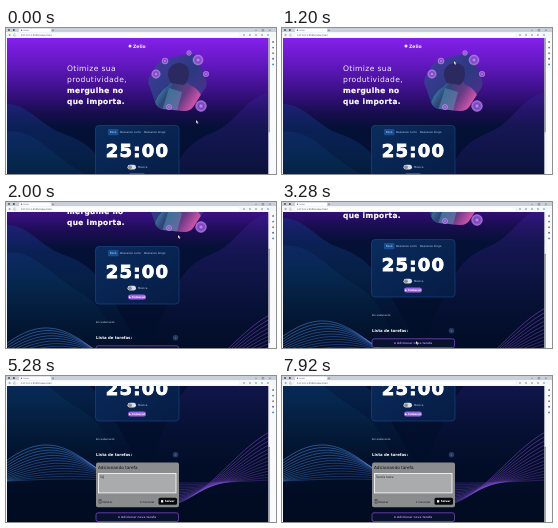
These frames come from a looping animation (270 px wide and 146 px high, 8 s). An HTML page:

```html
<!DOCTYPE html>
<html lang="pt-BR">
<head>
<meta charset="utf-8">
<title>Temporizador</title>
<style>
html, body { margin: 0; width: 100%; height: 100%; overflow: hidden; background: #020d28; }
svg { display: block; width: 100vw; height: 100vh; font-family: "DejaVu Sans", sans-serif; }
.b { font-weight: 700; }
.mid { text-anchor: middle; }
</style>
</head>
<body>
<svg viewBox="0 0 270 146" preserveAspectRatio="none">
  <defs>
    <linearGradient id="sky" x1="0" y1="0" x2="0" y2="1">
      <stop offset="0" stop-color="#8420ea"/>
      <stop offset=".3" stop-color="#6118be"/>
      <stop offset=".6" stop-color="#3a1084"/>
      <stop offset=".82" stop-color="#190d50"/>
      <stop offset="1" stop-color="#041036"/>
    </linearGradient>
    <linearGradient id="deep" x1="0" y1="0" x2="0" y2="1">
      <stop offset="0" stop-color="#041036"/>
      <stop offset=".4" stop-color="#020f2d"/>
      <stop offset="1" stop-color="#010b20"/>
    </linearGradient>
    <linearGradient id="hillLeft" gradientUnits="userSpaceOnUse" x1="0" y1="70" x2="0" y2="205">
      <stop offset="0" stop-color="#1c2f8c" stop-opacity=".55"/>
      <stop offset=".45" stop-color="#07305a" stop-opacity=".5"/>
      <stop offset="1" stop-color="#042238" stop-opacity="0"/>
    </linearGradient>
    <linearGradient id="hillRight" gradientUnits="userSpaceOnUse" x1="0" y1="60" x2="0" y2="200">
      <stop offset="0" stop-color="#3a1f94" stop-opacity=".5"/>
      <stop offset=".5" stop-color="#1c1a5c" stop-opacity=".45"/>
      <stop offset="1" stop-color="#0c1238" stop-opacity="0"/>
    </linearGradient>
    <linearGradient id="line" gradientUnits="userSpaceOnUse" x1="0" y1="0" x2="264" y2="0">
      <stop offset="0" stop-color="#4aa0ee"/>
      <stop offset=".4" stop-color="#4a78dc"/>
      <stop offset=".7" stop-color="#7a4ad0"/>
      <stop offset="1" stop-color="#9c4ee0"/>
    </linearGradient>
    <linearGradient id="card" x1="0" y1="0" x2="1" y2="1">
      <stop offset="0" stop-color="#0a2c5e"/>
      <stop offset="1" stop-color="#061c44"/>
    </linearGradient>
    <linearGradient id="frame" x1="0" y1="0" x2="1" y2="1">
      <stop offset="0" stop-color="#4a3aa4"/>
      <stop offset=".5" stop-color="#2a3a80"/>
      <stop offset="1" stop-color="#5c2a94"/>
    </linearGradient>
    <linearGradient id="coat" x1="0" y1="0" x2="1" y2=".4">
      <stop offset="0" stop-color="#4ac4d4"/>
      <stop offset=".4" stop-color="#2f4478"/>
      <stop offset=".7" stop-color="#6a3a86"/>
      <stop offset="1" stop-color="#dc58ac"/>
    </linearGradient>
    <radialGradient id="ball">
      <stop offset="0" stop-color="#d9b8f4"/>
      <stop offset=".45" stop-color="#8644cc"/>
      <stop offset="1" stop-color="#b27be6"/>
    </radialGradient>
    <clipPath id="view"><rect x="1" y="10" width="261.5" height="136"/></clipPath>
    <clipPath id="blob"><path id="blobShape" d="M149 39 Q152 34 158 32 L182 26 Q189 25 192 31 L200 52 Q202 57 198 62 L187 79 Q184 83 178 83 L157 81 Q151 80 149 74 L143 57 Q141 52 144 48Z"/></clipPath>
  </defs>

  <rect width="270" height="146" fill="#f6f7f9"/>
  <g clip-path="url(#view)">
    <g id="page">
      <rect y="10" width="264" height="90" fill="url(#sky)"/>
      <rect y="99.5" width="264" height="160" fill="url(#deep)"/>
      <path d="M0 76 C24 76 34 98 58 106 S92 126 106 150 S128 190 140 205 H0Z" fill="url(#hillLeft)"/>
      <path d="M0 104 C28 100 44 126 72 142 S104 180 116 205 H0Z" fill="url(#hillLeft)"/>
      <path d="M264 64 C238 70 232 94 208 104 S176 124 164 150 S146 188 140 205 H264Z" fill="url(#hillRight)"/>
      <g id="waves" fill="none" stroke="url(#line)" stroke-width=".55"></g>

      <circle cx="124" cy="18" r="1.5" fill="#f3eaff"/>
      <text class="b" x="127" y="19.8" font-size="4.6" fill="#f3eaff">Zelio</text>

      <g fill="#f1eafc" font-size="7.6" letter-spacing=".35">
        <text x="61" y="42.5">Otimize sua</text>
        <text x="61" y="53.5">produtividade,</text>
        <g class="b" font-size="7.4" fill="#fff" stroke="#fff" stroke-width=".2">
          <text x="61" y="64.5">mergulhe no</text>
          <text x="61" y="75.5">que importa.</text>
        </g>
      </g>

      <use href="#blobShape" fill="url(#frame)"/>
      <g clip-path="url(#blob)">
        <path d="M147 84 Q149 66 162 58 L167 52 L179 52 L184 57 Q198 62 198 84Z" fill="url(#coat)"/>
        <path d="M165 55 Q160 47 163 41 Q167 34 175 35 Q183 37 183 45 Q183 53 178 57Z" fill="#2c2860"/>
        <path d="M163 60 L176 64 L171 83 L156 83Z" fill="#59c2cd" opacity=".35"/>
      </g>
      <g id="balls" fill="url(#ball)" stroke="#d2a9f2" stroke-width=".4"></g>

      <rect x="89.5" y="97.5" width="83.5" height="57.5" rx="3.5" fill="url(#card)" stroke="#1b4b86" stroke-width=".6"/>
      <rect x="102" y="101" width="10.5" height="6.2" rx="1" fill="#184d90"/>
      <g font-size="2.7" fill="#c6d3e7">
        <text class="mid" x="107.2" y="105.2" fill="#fff">Foco</text>
        <text x="114" y="105.2">Descanso curto</text>
        <text x="138" y="105.2">Descanso longo</text>
        <text x="132" y="140.2">Música</text>
      </g>
      <text class="b mid" x="131.5" y="128.7" font-size="18" letter-spacing="1.2" fill="#fff" stroke="#fff" stroke-width=".9">25:00</text>
      <rect x="121.5" y="136.8" width="8.5" height="4.8" rx="2.4" fill="#dcdfe5"/>
      <circle cx="124" cy="139.2" r="1.9" fill="#8b919d"/>
      <rect x="122" y="145.6" width="18" height="5" rx="2.5" fill="#9a63e0"/>
      <text class="b mid" x="131" y="149" font-size="2.7" fill="#fff">▶ Começar</text>

      <text x="90" y="174" font-size="2.4" fill="#dfe5ee">Em andamento:</text>
      <text class="b" x="90" y="190.2" font-size="3.9" fill="#fff">Lista de tarefas:</text>
      <circle cx="169.5" cy="188.7" r="2.4" fill="#102a55" stroke="#5a6c98" stroke-width=".4"/>
      <path d="M168.5 188h2M168.5 188.8h2M168.5 189.6h2" stroke="#a9b7d5" stroke-width=".3"/>

      <g id="form">
        <rect x="90" y="196.6" width="83" height="44.6" rx="2" fill="#8a8c8e"/>
        <text x="92" y="202.7" font-size="4.2" fill="#0c0e12">Adicionando tarefa</text>
        <rect id="field" x="92.5" y="207.4" width="77.5" height="19.5" fill="#a9abad"/>
        <text id="entry" x="94" y="212.2" font-size="3"></text>
        <path id="caret" stroke="#111" stroke-width=".35"/>
        <path d="M93 234.2h2.2v3H93zM92.6 233.6h3" fill="none" stroke="#16181c" stroke-width=".4"/>
        <g font-size="2.7" fill="#14171b">
          <text x="96.5" y="236.7">Deletar</text>
          <text x="133.5" y="236.7">✕ Cancelar</text>
        </g>
        <rect x="152.5" y="231.8" width="18.5" height="7" rx="1.5" fill="#07090d"/>
        <rect x="155" y="234.2" width="2.2" height="2.2" fill="#fff"/>
        <text class="b" x="158.7" y="236.4" font-size="2.8" fill="#fff">Salvar</text>
      </g>
      <g id="add">
        <rect x="90" y="196.8" width="82.5" height="8.7" rx="2" fill="#08122f" stroke="#8450d0" stroke-width=".7"/>
        <text class="b mid" x="131" y="202.2" font-size="2.9" fill="#b07cf0">⊕ Adicionar nova tarefa</text>
      </g>
    </g>
  </g>

  <rect width="270" height="4" fill="#c9d0da"/>
  <path d="M13 4V1.4Q13 .5 14 .5H44Q45 .5 45 1.4V4Z" fill="#fbfcfd"/>
  <g fill="#3f4651">
    <circle cx="3" cy="2" r=".9"/><rect x="7" y="1.2" width="1.7" height="1.7"/>
    <circle cx="15.5" cy="2.3" r=".7" fill="#7847c0"/>
    <text x="17.5" y="3" font-size="2">Início</text>
    <path d="M47 1.3v2M46 2.3h2M249 2.3h2M256 1.4h1.7v1.7h-1.7zM263 1.4l1.8 1.8m0-1.8l-1.8 1.8" fill="none" stroke="#3f4651" stroke-width=".35"/>
  </g>
  <rect y="4" width="270" height="6" fill="#f6f7f9"/>
  <rect x="12" y="4.9" width="222" height="4.2" rx="2" fill="#fff" stroke="#e0e4e9" stroke-width=".3"/>
  <path d="M4 6l-1.2 1 1.2 1M2.8 7H5M9.4 6.2a1.1 1.1 0 1 0 .4 1.3" fill="none" stroke="#555d68" stroke-width=".4"/>
  <text x="15" y="7.9" font-size="2.3" fill="#343b45">127.0.0.1:5500/index.html</text>
  <g id="tools"></g>
  <rect x="262.5" y="10" width="1.7" height="136" fill="#f1f2f4"/>
  <rect id="thumb" x="262.5" width="1.1" rx=".5" fill="#777c85"/>
  <rect x="264.2" y="10" width="5.8" height="136" fill="#fafbfc"/>
  <g id="side"></g>
  <path id="pointer" d="M0 0V3.4L.9 2.6 1.5 3.9 2.1 3.6 1.5 2.4H2.6Z" fill="#fff" stroke="#222" stroke-width=".2"/>
</svg>
<script>
const LOOP = 8000;
const OPEN = 3600;
const FOCUS = 4400;
const TYPING = 4780;
const TYPED = "Tarefa teste";
const $ = id => document.getElementById(id);
const set = (el, attrs) => Object.entries(attrs).forEach(([k, v]) => el.setAttribute(k, v));

function add(parent, tag, attrs) {
  const el = document.createElementNS("http://www.w3.org/2000/svg", tag);
  set(el, attrs);
  parent.append(el);
}

// Strands share one swell, with shrinking height and drifting phase.
for (let i = 0; i < 14; i++) {
  const k = i / 13;
  let d = "";
  for (let x = 0; x <= 264; x += 4) {
    const swell = Math.cos(2 * Math.PI * (x - 40 - k * 24) / 240);
    const y = 211 + k * 4 - (32 - 30 * k) * swell - (x / 264) ** 3 * 16 * (1 - k);
    d += (x ? "L" : "M") + x + " " + y.toFixed(2);
  }
  add($("waves"), "path", { d, opacity: (0.9 - 0.4 * k).toFixed(2) });
}

[[150, 46, 4.2], [159, 33, 3], [183, 25, 2.4], [192, 32, 5], [200, 46, 2.8], [195, 78, 5.4], [163, 79, 2.6]]
  .forEach(([cx, cy, r]) => add($("balls"), "circle", { cx, cy, r, opacity: 0.9 }));

for (let i = 0; i < 5; i++) add($("tools"), "circle", { cx: 238 + i * 6, cy: 7, r: 0.8, fill: i === 4 ? "#3c8bd6" : "#757d89" });
["#707985", "#3982d2", "#b27444", "#5661c4", "#4584c8"].forEach((fill, i) =>
  add($("side"), "circle", { cx: 267.1, cy: 14 + i * 5.6, r: 0.95, fill }));

// Eased interpolation through [time, value] stops.
function track(stops, t) {
  if (t <= stops[0][0]) return stops[0][1];
  for (let i = 1; i < stops.length; i++) {
    const [t0, a] = stops[i - 1], [t1, b] = stops[i];
    if (t < t1) {
      const p = (t - t0) / (t1 - t0);
      return a + (b - a) * p * p * (3 - 2 * p);
    }
  }
  return stops[stops.length - 1][1];
}

const scroll = [[1440, 0], [1920, 53], [2160, 53], [2480, 60], [OPEN, 60], [3820, 104], [4480, 104], [4720, 110]];
const mouseX = [[0, 190], [1200, 172], [2080, 172], [3000, 134], [3560, 134], [3820, 139]];
const mouseY = [[0, 92], [1200, 33], [2080, 33], [3000, 139], [3560, 139], [3820, 114]];

function draw(t) {
  const y = track(scroll, t);
  const open = t >= OPEN, focus = t >= FOCUS;
  const height = open ? 246 : 196;
  set($("page"), { transform: `translate(0 ${-y})` });
  set($("thumb"), { y: 10 + y * 136 / height, height: 136 * 136 / height });
  set($("form"), { visibility: open ? "visible" : "hidden" });
  set($("add"), { transform: `translate(0 ${open ? 50 : 0})` });
  set($("field"), { stroke: focus ? "#fff" : "#979a9c", "stroke-width": focus ? 0.8 : 0.3 });

  const count = Math.max(0, Math.min(TYPED.length, Math.floor((t - TYPING) / 250)));
  const entry = $("entry");
  entry.textContent = count ? TYPED.slice(0, count) : "No que você está trabalhando?";
  set(entry, { fill: count ? "#202329" : "#686c71" });
  const x = 94.2 + (count ? entry.getComputedTextLength() : 0);
  set($("caret"), { d: `M${x} 209.3v3.4`, opacity: focus && t % 1000 < 500 ? 1 : 0 });
  // The pointer hides while typing.
  set($("pointer"), {
    transform: `translate(${track(mouseX, t)} ${track(mouseY, t)})`,
    visibility: t < TYPING ? "visible" : "hidden"
  });
}

function tick(now) {
  draw(now % LOOP);
  requestAnimationFrame(tick);
}
draw(0);
requestAnimationFrame(tick);
</script>
</body>
</html>
```
